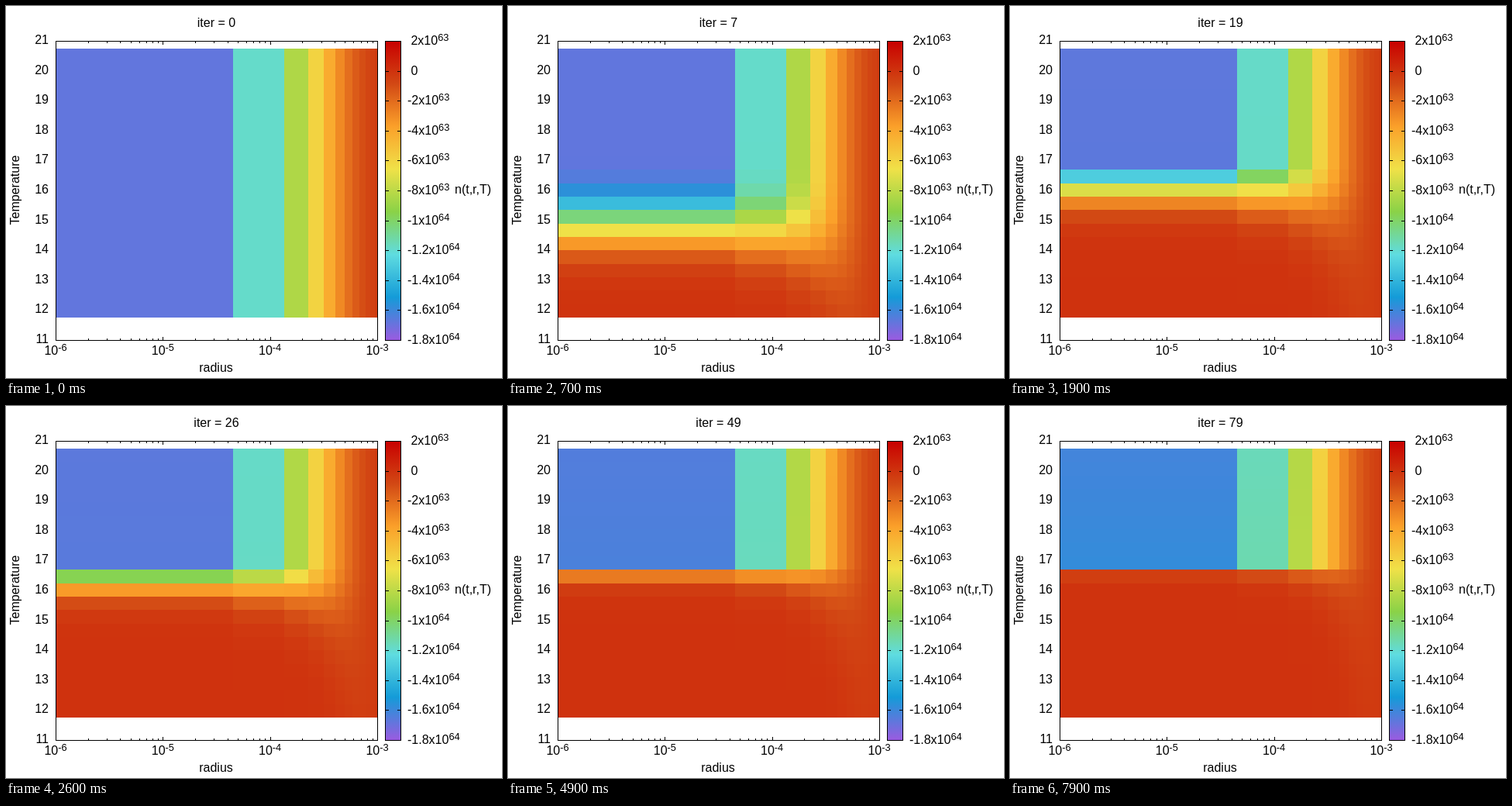
Recreate the animation shown at these times as an HTML page. Size 640x480 px, loop 8 s.

```html
<!DOCTYPE html>
<html lang="en">
<head>
<meta charset="utf-8">
<title>n(t,r,T)</title>
<style>
  html, body { margin: 0; width: 100%; height: 100%; overflow: hidden; background: #fff; }
  svg { display: block; width: 640px; height: 480px; font: 16px "Liberation Sans", Arial, sans-serif; }
  text { white-space: pre; }
</style>
</head>
<body>
<svg id="plot" viewBox="0 0 640 480"></svg>
<script>
const svg = document.getElementById('plot');
const LEFT = 64, TOP = 45, RIGHT = 479, BOTTOM = 431;
const COLS = 12, ROWS = 20, STEPS = 80, STEP_MS = 100;

// Evenly spaced from -18 to 2 (units of 1e63)
const PALETTE = [
  [154, 91, 224], [20, 155, 216], [95, 220, 224], [138, 210, 71],
  [240, 225, 72], [251, 160, 42], [210, 72, 20], [200, 0, 0]
];

// Decay time of each row, in iterations, from the freezing front downwards
const FRONT = 9;
const TAU = [29.6, 17.8, 12, 8.5, 6.28, 4.75, 3.55, 2.75, 2.15, 1.7, 1.35];

function add(name, attrs, parent = svg) {
  const el = document.createElementNS('http://www.w3.org/2000/svg', name);
  for (const key in attrs) el.setAttribute(key, attrs[key]);
  parent.appendChild(el);
  return el;
}

function label(x, y, str, anchor = 'start', sup = '') {
  const el = add('text', { x, y, 'text-anchor': anchor });
  el.textContent = str;
  if (sup) add('tspan', { dy: -5.5, 'font-size': 12.8 }, el).textContent = sup;
  return el;
}

function line(x1, y1, x2, y2) {
  add('path', { d: `M${x1} ${y1}L${x2} ${y2}`, stroke: '#000', 'shape-rendering': 'crispEdges' });
}

function frame(x, y, right, bottom) {
  add('rect', {
    x: x + .5, y: y + .5, width: right - x, height: bottom - y,
    fill: 'none', stroke: '#000', 'shape-rendering': 'crispEdges'
  });
}

const rgb = c => `rgb(${c.map(Math.round).join(',')})`;

function colour(value) {
  const pos = Math.min(.9999, Math.max(0, (value + 18) / 20)) * (PALETTE.length - 1);
  const i = Math.floor(pos);
  return rgb(PALETTE[i].map((c, n) => c + (PALETTE[i + 1][n] - c) * (pos - i)));
}

// Solves ln(a) + 0.4 a = 2.8 ln(t / tau) for the damping a
function frontDamping(t, tau) {
  const c = 2.8 * Math.log(t / tau);
  let u = Math.min(c, 2);
  for (let n = 0; n < 10; n++) {
    const e = .4 * Math.exp(u);
    u -= (u + e - c) / (1 + e);
  }
  return Math.exp(u);
}

function damping(row, t) {
  if (t === 0) return 0;
  if (row >= FRONT) return frontDamping(t, TAU[row - FRONT]);
  return .04 * (1 + .06 * row) * (t / 79) ** 1.5;
}

const density = (col, damp) => -16.8 * .707 ** col * Math.exp(-damp * .7 ** col);

const xOf = r => LEFT + (RIGHT - LEFT) * Math.log10(r / 1e-6) / 3;
const colEdge = k => k === 0 ? LEFT + 1 : Math.min(RIGHT, Math.round(xOf((k - .5) * 1e-3 / 11)));
const rowEdge = i => Math.round(55 + 17.35 * i);

// Axis ticks lie beneath the map
for (let d = 0; d <= 3; d++) {
  const x0 = LEFT + (RIGHT - LEFT) * d / 3;
  label(x0, 450, '10', 'middle', String(d - 6));
  for (let m = 1; m < 10 && d < 3; m++) {
    const x = Math.round(xOf(m * 10 ** (d - 6))) + .5;
    const len = m === 1 ? 5 : 3;
    line(x, TOP, x, TOP + len);
    line(x, BOTTOM + 1, x, BOTTOM + 1 - len);
  }
}
for (let temp = 11; temp <= 21; temp++) {
  const y = Math.round(BOTTOM - (temp - 11) * 38.6);
  label(55, y + 4, String(temp), 'end');
  line(LEFT, y + .5, LEFT + 5, y + .5);
  line(RIGHT - 4, y + .5, RIGHT + 1, y + .5);
}

const cells = [];
for (let row = 0; row < ROWS; row++) {
  for (let col = 0; col < COLS; col++) {
    const x = colEdge(col), y = rowEdge(row);
    cells.push(add('rect', {
      x, y, width: colEdge(col + 1) - x, height: rowEdge(row + 1) - y,
      'shape-rendering': 'crispEdges'
    }));
  }
}
frame(LEFT, TOP, RIGHT, BOTTOM);

// Colour scale
const gradient = add('linearGradient', { id: 'scale', x1: 0, y1: 1, x2: 0, y2: 0 }, add('defs', {}));
PALETTE.forEach((c, i) => add('stop', { offset: i / (PALETTE.length - 1), 'stop-color': rgb(c) }, gradient));
add('rect', { x: 489, y: TOP, width: 21, height: BOTTOM - TOP, fill: 'url(#scale)' });
for (let v = 2; v >= -18; v -= 2) {
  const y = Math.round(TOP + (2 - v) * 19.3);
  const big = v <= -10;
  const mantissa = (v > 0 ? ' ' : '') + (big ? v / 10 : v);
  line(489, y + .5, 494, y + .5);
  line(505, y + .5, 510, y + .5);
  if (v === 0) label(518, y + 5, ' 0');
  else label(518, y + 5, mantissa + 'x10', 'start', big ? '64' : '63');
}
frame(489, TOP, 509, BOTTOM);

label(271, 472, 'radius', 'middle');
label(579, 242, 'n(t,r,T)');
label(0, 0, 'Temperature', 'middle').setAttribute('transform', 'translate(17 237.5) rotate(-90)');
const title = label(271.5, 27, '', 'middle');

let shown = -1;
function draw(ms) {
  const iter = Math.floor(ms / STEP_MS) % STEPS;
  if (iter === shown) return;
  shown = iter;
  title.textContent = 'iter = ' + iter;
  for (let row = 0; row < ROWS; row++) {
    const damp = damping(row, iter);
    for (let col = 0; col < COLS; col++) {
      cells[row * COLS + col].setAttribute('fill', colour(density(col, damp)));
    }
  }
}

const start = performance.now();
function tick() {
  draw(performance.now() - start);
  requestAnimationFrame(tick);
}
tick();
</script>
</body>
</html>
```
